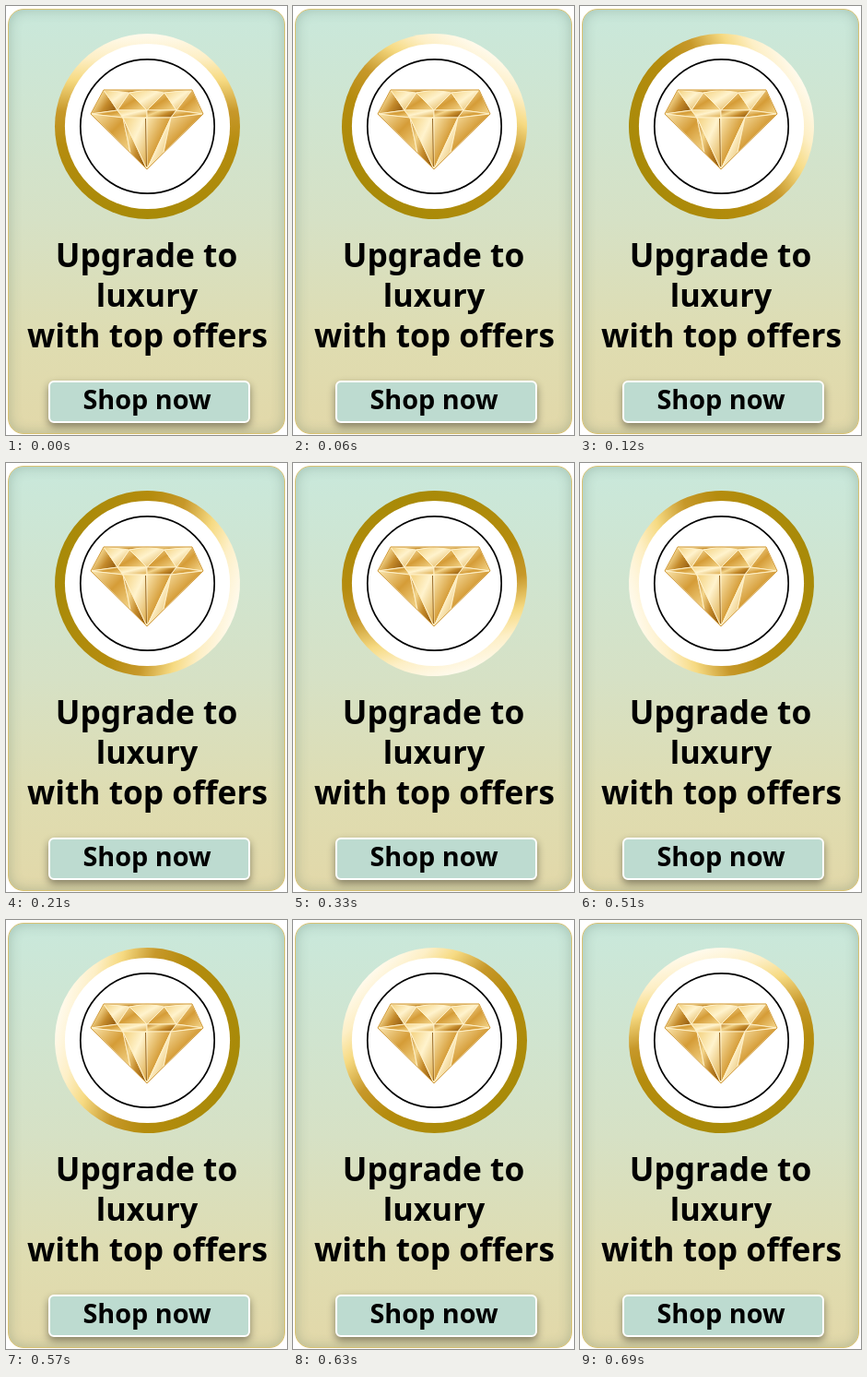
Animation of 305 by 465 pixels, one loop 720 ms. Source, as an HTML page:

```html
<!DOCTYPE html>
<html lang="en">
<head>
<meta charset="utf-8">
<style>
html, body { margin: 0; width: 100%; height: 100%; overflow: hidden; background: #fff; }
body::before {
  content: ""; position: absolute; left: 2px; top: 3px; width: 299px; height: 459px;
  border: 1px solid #d9c272; border-radius: 17px;
  background: linear-gradient(#c9e8db, #d6e1c5 50%, #dfdcb0 80%, #e2d8a9);
  box-shadow: inset 0 0 14px #4a6a5a50;
}
svg { display: block; position: relative; width: 305px; height: 465px; }
text { font: 700 35.3px "Noto Sans", "Open Sans", sans-serif; text-anchor: middle; }
.button { filter: drop-shadow(0 4px 4px #0006); }
</style>
</head>
<body>
<svg viewBox="0 0 305 465">
  <defs>
    <linearGradient id="gold" x2="0" y2="1">
      <stop stop-color="#fffaec"/><stop offset=".13" stop-color="#fdefc6"/>
      <stop offset=".25" stop-color="#f6da82"/><stop offset=".42" stop-color="#c7982a"/>
      <stop offset=".6" stop-color="#b58c0e"/><stop offset="1" stop-color="#a88a08"/>
    </linearGradient>
    <linearGradient id="pale" x2="1" y2="1">
      <stop stop-color="#f3d07c"/><stop offset=".45" stop-color="#fff3cd"/><stop offset="1" stop-color="#dba743"/>
    </linearGradient>
    <linearGradient id="mid" x2="1" y2="1">
      <stop stop-color="#fbe6ae"/><stop offset=".5" stop-color="#d59c37"/><stop offset="1" stop-color="#f6d98f"/>
    </linearGradient>
    <linearGradient id="deep" x2="1" y2=".6">
      <stop stop-color="#b97a20"/><stop offset=".35" stop-color="#f4d68c"/>
      <stop offset=".7" stop-color="#c48a2b"/><stop offset="1" stop-color="#9c6415"/>
    </linearGradient>
  </defs>
  <circle id="ring" cx="153.5" cy="130.5" r="100.5" fill="url(#gold)"/>
  <circle cx="153.5" cy="130.5" r="89.6" fill="#fff"/>
  <circle cx="153.5" cy="130.5" r="72.7" fill="none" stroke="#000" stroke-width="1.7"/>
  <g id="diamond" stroke="#fff2cb" stroke-width=".9" stroke-linejoin="round"></g>
  <path d="M106 91H202L214 117L153 177L92 117Z" fill="none" stroke="#d09a3c" stroke-linejoin="round"/>
  <text x="152.5" y="283">Upgrade to</text>
  <text x="153" y="326" style="font-size:34.3px">luxury</text>
  <text x="153.5" y="370">with top offers</text>
  <rect class="button" x="47" y="407" width="217" height="44" rx="5" fill="#bddbd0" stroke="#fff" stroke-width="2"/>
  <text x="153" y="437" style="font-size:28.8px">Shop now</text>
</svg>
<script>
const facets = [
  ["deep", "106 91 92 117 121 113"],
  ["pale", "106 91 134 94 121 113"],
  ["deep", "106 91 153 91 134 94"],
  ["mid", "134 94 153 113 121 113"],
  ["pale", "134 94 153 91 172 94 153 113"],
  ["mid", "172 94 185 113 153 113"],
  ["deep", "153 91 202 91 172 94"],
  ["pale", "202 91 172 94 185 113"],
  ["mid", "202 91 214 117 185 113"],
  ["mid", "92 117 121 113 127 121"],
  ["pale", "121 113 153 113 153 121 127 121"],
  ["deep", "153 113 185 113 179 121 153 121"],
  ["mid", "185 113 214 117 179 121"],
  ["mid", "92 117 127 121 135 159"],
  ["deep", "127 121 135 159 153 177"],
  ["pale", "127 121 153 121 153 177"],
  ["mid", "153 121 179 121 153 177"],
  ["pale", "179 121 171 159 153 177"],
  ["mid", "179 121 214 117 171 159"]
];
document.getElementById("diamond").innerHTML = facets
  .map(([tone, points]) => `<polygon points="${points}" fill="url(#${tone})"/>`).join("") +
  '<path d="M151.5 122L152.5 174" stroke="#8d5a14"/>';

const ring = document.getElementById("ring");
function draw() {
  const step = Math.floor(performance.now() % 720 / 30);
  ring.setAttribute("transform", `rotate(${step * 15} 153.5 130.5)`);
  requestAnimationFrame(draw);
}
draw();
</script>
</body>
</html>
```
